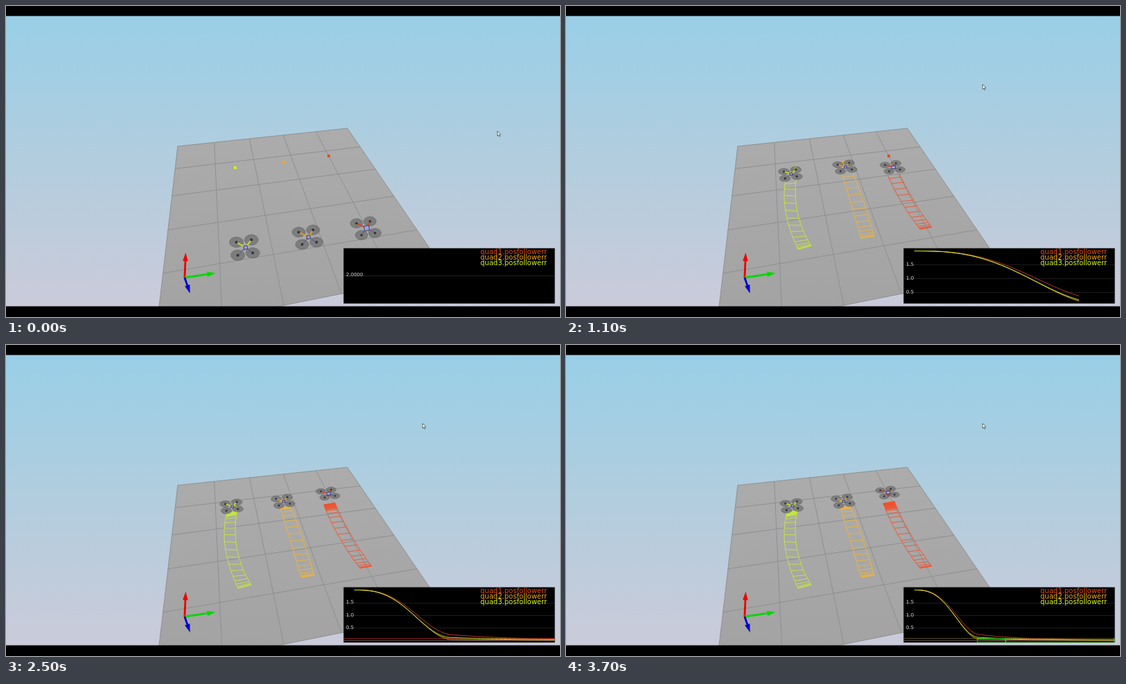
Animation, 800 px wide and 450 px high, one loop 3800 ms. Source, as an HTML page with a canvas:

```html
<!DOCTYPE html>
<html lang="en">
<head>
<meta charset="utf-8">
<title>Three quadrotors</title>
<style>
html, body { margin: 0; width: 100%; height: 100%; overflow: hidden; background: #000; }
canvas { display: block; width: 800px; height: 450px; }
</style>
</head>
<body>
<canvas id="stage" width="800" height="450"></canvas>
<script>
const g = document.getElementById('stage').getContext('2d');
const LOOP = 3800, STEP = 100, DELAY = 0.64, SETTLED = 34;

// time: steps until arrival, rest: error left on arrival, rails: quadratic curves,
// lift: offset from the trail once airborne, swing/calm: pitching and its damping.
const quads = [
  {
    color: '#e8481a', trail: '#f0522c', arm: '#d8441c', dot: [466, 217],
    time: 12, rest: 0.22, size: 0.9, skew: 4, body: 4.6, lift: [-2, -14.5], wait: 6, swing: 0.28, calm: 12,
    rails: [[[511, 323], [476, 277], [458, 229]], [[528, 320], [495, 276], [474, 226]]]
  },
  {
    color: '#f5a623', trail: '#f0b43c', arm: '#e8a21c', dot: [401, 226],
    time: 11.9, rest: 0.03, size: 0.96, skew: 2.6, body: 3, lift: [-3.5, -9], wait: 0, swing: 0.26, calm: 5,
    rails: [[[426, 336], [410, 279], [396, 236]], [[445, 333], [430, 278], [411, 234]]]
  },
  {
    color: '#d2f51e', trail: '#c4e83c', arm: '#cbe61a', dot: [331, 234],
    time: 11.7, rest: 0.11, size: 1, skew: 1, body: 3, lift: [-0.5, -8.5], wait: 0, swing: 0.28, calm: 8,
    rails: [[[335, 352], [306, 290], [319, 243]], [[354, 347], [323, 297], [334, 239]]]
  }
];

const clamp = v => Math.min(Math.max(v, 0), 1);

// Distance to the goal: a slow start, a smooth fall, a fading rest.
function error(q, t) {
  const left = (1 + Math.cos(Math.PI * clamp(t / q.time) ** 1.38)) / 2;
  return 2 * left + q.rest * (1 - left) * Math.exp(-Math.max(0, t - q.time) / 8);
}

function bezier([a, b, c], s) {
  return [0, 1].map(k => (1 - s) ** 2 * a[k] + 2 * s * (1 - s) * b[k] + s * s * c[k]);
}

// Both ends of the trail's rung at a flight time.
function rung(q, t) {
  const p = 1 - error(q, t) / 2;
  return q.rails.map(r => bezier(r, p * (1.09 - 0.09 * p)));
}

// Perspective map from the unit square to the floor.
function floorMap([x0, y0], [x1, y1], [x2, y2], [x3, y3]) {
  const ax = x1 - x2, ay = y1 - y2, bx = x3 - x2, by = y3 - y2;
  const sx = x0 - x1 + x2 - x3, sy = y0 - y1 + y2 - y3, det = ax * by - bx * ay;
  const m = (sx * by - bx * sy) / det, n = (ax * sy - sx * ay) / det;
  return (u, v) => {
    const w = m * u + n * v + 1;
    return [((x1 - x0 + m * x1) * u + (x3 - x0 + n * x3) * v + x0) / w,
      ((y1 - y0 + m * y1) * u + (y3 - y0 + n * y3) * v + y0) / w];
  };
}
const ground = floorMap([248, 203], [493, 177], [636, 386], [217, 470]);

function path(pts, close) {
  g.beginPath();
  pts.forEach(p => g.lineTo(p[0], p[1]));
  if (close) g.closePath();
}

function line(pts, color, width = 1) {
  path(pts);
  g.strokeStyle = color;
  g.lineWidth = width;
  g.stroke();
}

function fill(pts, color) {
  path(pts, true);
  g.fillStyle = color;
  g.fill();
}

function outline(color, width) {
  g.strokeStyle = color;
  g.lineWidth = width;
  g.stroke();
}

function oval(x, y, rx, ry, color) {
  g.beginPath();
  g.ellipse(x, y, rx, ry, 0, 0, 7);
  g.fillStyle = color;
  g.fill();
}

function shade(y0, y1, ...colors) {
  const s = g.createLinearGradient(0, y0, 0, y1);
  colors.forEach((c, i) => s.addColorStop(i / (colors.length - 1), c));
  return s;
}

function arrow(x, y, color) {
  const base = [258, 393], l = Math.hypot(x - base[0], y - base[1]);
  const dx = (x - base[0]) / l, dy = (y - base[1]) / l, nx = x - 12 * dx, ny = y - 12 * dy;
  line([base, [nx, ny]], color, 2.8);
  fill([[x, y], [nx - 3.8 * dy, ny + 3.8 * dx], [nx + 3.8 * dy, ny - 3.8 * dx]], color);
}

function scene() {
  g.fillStyle = shade(15, 435, '#99cfe7', '#b2cdde', '#cbcbda');
  g.fillRect(0, 0, 800, 450);
  fill([ground(0, 0), ground(1, 0), ground(1, 1), ground(0, 1)], shade(177, 435, '#acacac', '#a3a3a3'));
  for (let i = 0; i <= 5; i++) {
    line([ground(i / 5, 0), ground(i / 5, 1)], '#8f8f8f');
    line([ground(0, i / 5), ground(1, i / 5)], '#8f8f8f');
  }
  quads.forEach(q => oval(...q.dot, 2.2, 2.2, q.color));
}

function trail(q, now) {
  if (now <= 0) return;
  const rungs = [];
  for (let t = 0; t < now; t += 0.7) rungs.push(rung(q, t));
  rungs.forEach(r => line(r, q.trail, 0.9));
  rungs.push(rung(q, now));
  [0, 1].forEach(k => line(rungs.map(r => r[k]), q.trail, 0.9));
}

function drone(q, now) {
  const [l, r] = rung(q, now), up = clamp((now - q.wait) / 6);
  const x = (l[0] + r[0]) / 2 + q.lift[0] * up, y = (l[1] + r[1]) / 2 + q.lift[1] * up;
  const k = q.size * (1 - 0.23 * (1 - error(q, now) / 2));
  // How far the rotor plane opens towards the viewer.
  const open = 0.58 + q.swing * Math.cos(Math.PI * now / 7) * Math.exp(-Math.max(0, now - 10) / q.calm);
  const at = (a, b) => [x + k * (10.8 * a + q.skew * b), y + k * (11 * open * b - 1.7 * a)];
  const tips = [at(-1, -1), at(1, -1), at(-1, 1), at(1, 1)];
  tips.forEach(p => {
    oval(...p, 10 * k, 10 * k * (0.2 + 0.65 * open), 'rgba(90,90,90,0.54)');
    outline('rgba(70,70,70,0.5)', 0.7);
  });
  const mid = [x + 1.5 * k, y];
  tips.forEach((p, i) => line([mid, p], i < 2 ? q.arm : '#66668c', (i < 2 ? 2 : 1.3) * k));
  tips.forEach(p => oval(...p, 2 * k, 2 * k, '#33333f'));
  const b = q.body * k, h = b * (0.3 + 0.8 * open);
  fill([[mid[0] - b, y - 0.7 * h], [mid[0] + 0.7 * b, y - h], [mid[0] + b, y + 0.7 * h],
    [mid[0] - 0.7 * b, y + h]], '#a0a0d8');
  outline('#30305c', 0.9);
}

function text(s, x, y, size, color) {
  g.font = size + 'px "DejaVu Sans", sans-serif';
  g.fillStyle = color;
  g.fillText(s, x, y);
}

function niceStep(range) {
  const raw = range / 4, mag = 10 ** Math.floor(Math.log10(raw)), m = raw / mag;
  return mag * (m < 1.5 ? 1 : m < 3.5 ? 2 : m < 7.5 ? 5 : 10);
}

function plot(t, now) {
  const wide = (y, color) => line([[488, Math.round(y) + 0.5], [792, Math.round(y) + 0.5]], color);
  if (now <= 0) {
    wide(390, '#222');
    text('2.0000', 491, 391.3, 7, '#ddd');
    return;
  }
  const count = Math.ceil(now / 0.2), times = Array.from({ length: count + 1 }, (_, i) => now * i / count);
  const curves = quads.map(q => times.map(s => error(q, s)));
  const low = Math.min(...curves.flat()), range = Math.max(2 - low, 1e-4);
  const px = Math.min(22.96, 289 / now), xOf = s => 503 + s * px;
  const yOf = v => 354.5 + (2 - v) / range * 72.5;
  const step = niceStep(range), digits = Math.max(0, Math.ceil(-Math.log10(step) - 1e-6));
  for (let v = 2 - step; yOf(v) < 420; v -= step) {
    wide(yOf(v), '#1d1d1d');
    text(v.toFixed(digits), 491, yOf(v) + 1.8, 7, '#ddd');
  }
  wide(yOf(0.08), t < SETTLED ? '#90200f' : '#55500c');
  wide(yOf(0), '#544448');
  curves.forEach((c, i) => line(c.map((v, j) => [xOf(times[j]), yOf(v)]), ['#b8391a', '#e0a020', '#cdea28'][i]));
  if (t >= SETTLED) {
    const a = xOf(11.45), b = xOf(16.6), green = '#22d422';
    line([[b, 424.5], [a, 424.5], [a, 430], [791.5, 430], [791.5, 424.5]], green);
    line([[b, 424.5], [b, 430]], green, 1.6);
  }
}

function chart(t, now) {
  g.save();
  g.beginPath();
  g.rect(487.5, 350.5, 305, 80);
  g.clip();
  g.fillStyle = '#000';
  g.fillRect(487, 350, 306, 81);
  plot(t, now);
  quads.forEach((q, i) => text(`quad${i + 1}.posfollowerr`, 685, 359.3 + 8 * i, 10, q.color));
  g.restore();
}

function cursor(t) {
  const u = clamp((t - 1) / 6), e = u * u * (3 - 2 * u);
  const x = 709.7 - 108 * e, y = 181 - 67.5 * e;
  const shape = [[0, 0], [0, 7], [1.6, 5.6], [2.7, 8], [3.7, 7.5], [2.7, 5.2], [4.7, 5]];
  fill(shape.map(p => [x + p[0], y + p[1]]), '#fff');
  outline('#333', 0.7);
}

function draw(t) {
  const now = Math.max(0, t - DELAY);
  scene();
  quads.forEach(q => trail(q, now));
  quads.forEach(q => drone(q, now));
  arrow(259.5, 357, '#ee0000');
  arrow(302.5, 386.5, '#00d800');
  arrow(265.7, 415.7, '#0000c8');
  g.fillStyle = '#000';
  g.fillRect(0, 0, 800, 14.5);
  g.fillRect(0, 434.5, 800, 16);
  chart(t, now);
  cursor(t);
}

const start = performance.now();
let shown = -1;
function tick() {
  const t = Math.floor((performance.now() - start) % LOOP / STEP);
  if (t !== shown) draw(shown = t);
  requestAnimationFrame(tick);
}
tick();
</script>
</body>
</html>
```
